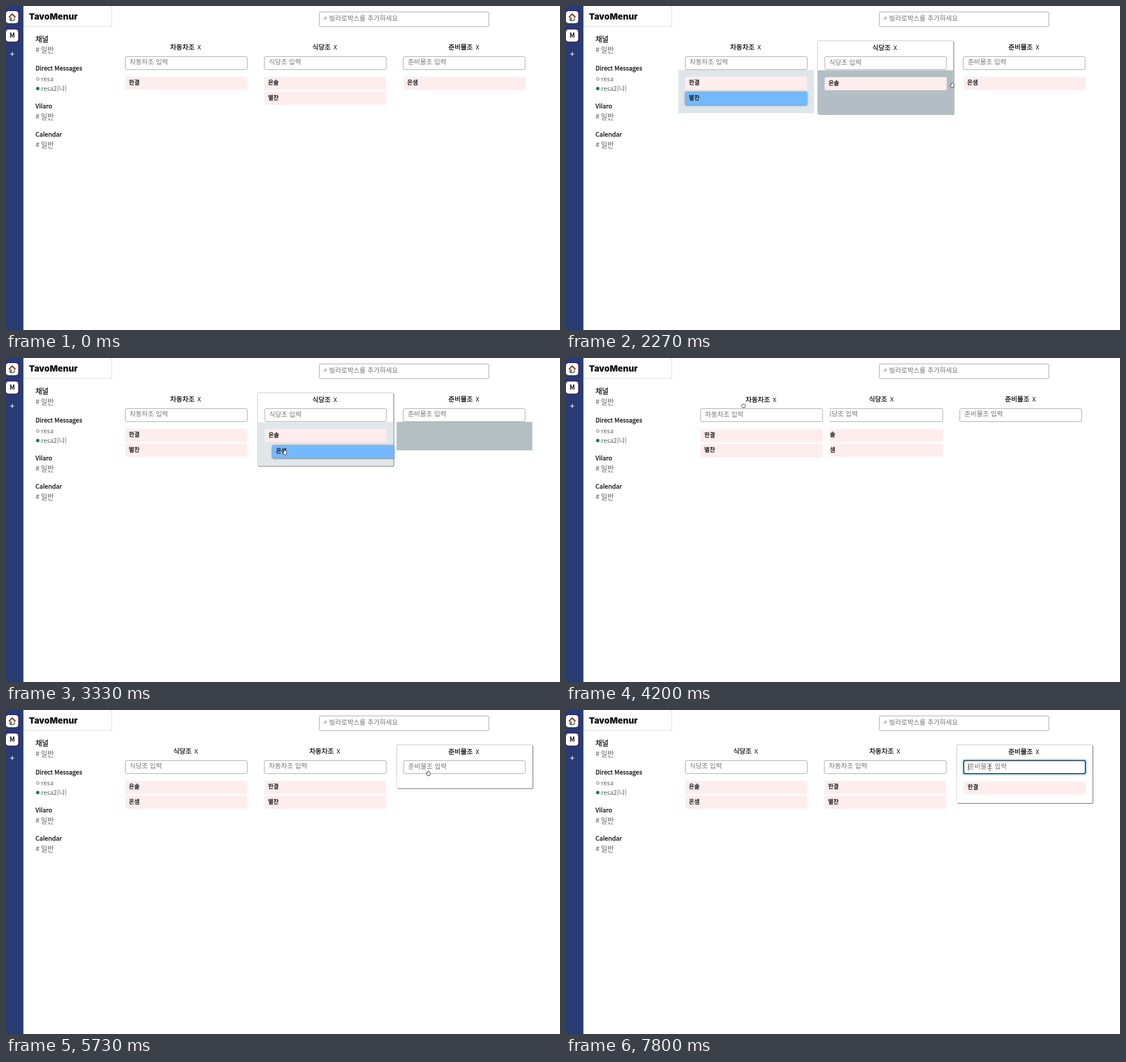
These frames come from a looping animation (977 px wide and 573 px high, 8 s). An HTML page:

```html
<!DOCTYPE html>
<html lang="ko">
<head>
<meta charset="utf-8">
<style>
  html, body { margin: 0; width: 100%; height: 100%; overflow: hidden; background: #fff; }
  svg { display: block; font: 11px "Noto Sans CJK KR", "Noto Sans CJK", "Noto Sans", sans-serif; fill: #111; }
  .brand { font: 900 15px Inter, sans-serif; }
  .medium { stroke: #111; stroke-width: .3; }
  .gray { fill: #606060; }
  .ko { font-size: 12.6px; }
  .title { font-size: 11.7px; text-anchor: middle; }
  .hint, .value { font-size: 11.7px; }
  .hint { fill: #757575; }
  .card { font-size: 10.2px; }
  .field { fill: #fff; stroke: #a9a9a9; }
  .focus { fill: #fff; stroke: #14202e; stroke-width: 1.5; }
  .glow { fill: #b4e1f3; }
  .tile { fill: #fff; stroke: #3f0e40; }
  .hover { stroke: #c8c8c8; filter: drop-shadow(1.5px 1.5px .7px #8a8a8a); }
  .paper { fill: #fff; }
  .rest { fill: #ffeded; }
  .lifted { fill: #74b9ff; filter: drop-shadow(0 1.5px 1.8px rgba(0, 0, 0, .5)); }
  .pointer { fill: #fff; stroke: #222; stroke-width: .9; stroke-linejoin: round; }
</style>
</head>
<body>
<svg width="977" height="573" viewBox="0 0 977 573">
  <rect width="30.7" height="573" fill="#273c75"/>
  <rect class="tile" x="-.5" y="8.5" width="22.5" height="22.5" rx="5"/>
  <path d="M7 19v7h8v-7l-4-4z" fill="#f4ead2" stroke="#333"/>
  <path d="M5 20l6-6 6 6" fill="none" stroke="#7c2f2b" stroke-width="1.6"/>
  <path d="M8 21h2v5h-2z" fill="#23804c"/>
  <rect class="tile" x="-.5" y="41" width="22.5" height="22.5" rx="5"/>
  <text x="11" y="56" text-anchor="middle" font-weight="700">M</text>
  <path d="M7.5 85h7M11 81.500v7" stroke="#fff" stroke-width="1.2"/>
  <path d="M31 36.500H186.500V0" fill="none" stroke="#dcdcdc"/>
  <text class="brand" x="40.500" y="24">TavoMenur</text>

  <g id="channels"></g>
  <text class="medium" x="52" y="113.5">Direct Messages</text>
  <circle cx="56" cy="129" r="2.4" fill="none" stroke="#777"/>
  <text class="gray" x="62" y="132.5">resa</text>
  <circle cx="56" cy="146" r="2.9" fill="#0a7a62"/>
  <text class="gray" x="62" y="149.5">resa2(나)</text>

  <rect class="field" x="552.5" y="10.5" width="299" height="26" rx="2.5"/>
  <text class="hint" x="560" y="26">+ 빌라로박스를 추가하세요</text>
  <g id="board"></g>
</svg>
<script>
const LOOP = 8000, STEP = 1000 / 15;
const WIDTH = 239.4, INNER = 215.3, ROW = 26.3, LIST_TOP = 113;
const slotX = i => 198 + 245.4 * i;
const cardPlace = (slot, row) => [slotX(slot) + 12, LIST_TOP + 12 + row * ROW];

// Pointer gestures: each eases from where the last one ended
const START = [156, 120];
const GESTURES = [
  { from: 400, to: 870, end: [483, 167] },
  { from: 1200, to: 1730, end: [216, 167] },
  { from: 1930, to: 2350, end: [734, 137] },
  { from: 2800, to: 3330, end: [492, 167] },
  { from: 3400, to: 3930, end: [286, 84] },
  { from: 4130, to: 4480, end: [548, 91] },
  { from: 4670, to: 5130, end: [745, 112] }
];

// Card and column moves; "enter" is when the card crosses into the new list
const CARD_DRAGS = [
  { name: '별찬', source: 1, dest: 0, lift: 1133, enter: 1467, drop: 1930, end: 2333 },
  { name: '온샘', source: 2, dest: 1, lift: 2867, enter: 3067, drop: 3333, end: 3667 }
];
const COLUMN_DRAG = { lift: 4130, enter: 4333, drop: 4667, end: 5000 };
const COLUMNS = [
  { name: '차동차조', cards: ['한결'] },
  { name: '식당조', cards: ['은솔', '별찬'] },
  { name: '준비물조', cards: ['온샘'] }
];

const FOCUS = 5930, MENU = 6000, TYPE = 7067, COMPOSE = 7267, SUBMIT = 7800;
const STAGES = ['ㅎ', '하', '한', '한ㄱ', '한겨', '한결'];

const within = (t, a, b) => t >= a && t < b;
const lerp = (a, b, p) => a + (b - a) * p;
const mix = (a, b, p) => a.map((v, i) => lerp(v, b[i], p));
const progress = (t, start, length) => Math.min(1, Math.max(0, (t - start) / length));
const easeOut = p => 1 - (1 - p) ** 4;
const easeInOut = p => p * p * (3 - 2 * p);

const pointerAt = t => GESTURES.reduce(
  (at, g) => mix(at, g.end, easeInOut(progress(t, g.from, g.to - g.from))), START);

// Follows the pointer until the drop, then settles on its new place
function carried(t, drag, home, place) {
  const grab = pointerAt(drag.lift), hand = pointerAt(Math.min(t, drag.drop));
  const held = home.map((v, i) => v + hand[i] - grab[i]);
  return mix(held, place, easeOut(progress(t, drag.drop, drag.end - drag.drop)));
}

const TINT = { none: [255, 255, 255], over: [223, 230, 233], left: [178, 190, 195] };
function listTint(t, index) {
  let color = TINT.none;
  const fade = (start, tone) => color = mix(color, TINT[tone], easeInOut(progress(t, start, 300)));
  for (const d of CARD_DRAGS) {
    if (d.source === index) { fade(d.lift, 'over'); fade(d.enter, 'left'); }
    if (d.dest === index) fade(d.enter, 'over');
    if (d.source === index || d.dest === index) fade(d.end, 'none');
  }
  return `rgb(${color.map(Math.round)})`;
}

// Cards lying in a list, and the rows it keeps open
function listState(t, index) {
  let cards = COLUMNS[index].cards, size = cards.length;
  for (const d of CARD_DRAGS) {
    if (d.source === index && t >= d.lift) cards = cards.filter(c => c !== d.name);
    if (d.dest === index && t >= d.end) cards = [...cards, d.name];
    size += (d.dest === index && t >= d.enter) - (d.source === index && t >= d.end);
  }
  if (index === 2 && t >= SUBMIT) { cards = [STAGES[5]]; size = 1; }
  return { cards, size, fill: listTint(t, index) };
}

function columnPlace(t, index) {
  const d = COLUMN_DRAG, gap = within(t, d.lift, d.end) ? 6 : 0;
  if (index === 0) return t < d.lift ? [slotX(0), 0] : carried(t, d, [slotX(0), 0], [slotX(1), 0]);
  const swap = index === 1 ? easeOut(progress(t, d.enter, 250)) : 0;
  return [lerp(slotX(index) - gap, slotX(0), swap), 0];
}

function typed(t) {
  if (!within(t, TYPE, SUBMIT)) return '';
  return STAGES[t < COMPOSE ? 0 : Math.min(5, 1 + Math.floor((t - COMPOSE) / 83))];
}

const rect = (x, y, w, h, cls, attrs = '') =>
  `<rect x="${x}" y="${y}" width="${w}" height="${h}" class="${cls}" ${attrs}/>`;
const text = (x, y, cls, s) => `<text x="${x}" y="${y}" class="${cls}">${s}</text>`;
const card = ([x, y], name, look) =>
  rect(x, y, INNER, 23.4, look, 'rx="2.5"') + text(x + 6.8, y + 14.4, 'medium card', name);

function column({ x, y, name, cards, size, fill, hover, focus, value }) {
  const height = 24 + size * ROW, inset = hover ? .7 : 0;
  const left = x + 12 + inset, top = y + inset, w = 215 - inset;
  const fieldX = Math.floor(left) + .5, fieldY = Math.floor(top + 89) + .5;
  const list = top + LIST_TOP;
  return rect(x + .3, y + 61.3, WIDTH, 51.5 + height + 2 * inset, hover ? 'paper hover' : 'paper', 'rx="2"') +
    rect(x + inset, list, WIDTH - inset, height, '', `fill="${fill}"`) +
    text(x + WIDTH / 2 - 1, top + 76.8, 'title', `<tspan class="medium">${name}</tspan><tspan dx="5" font-size="11">X</tspan>`) +
    (focus ? rect(fieldX - 3, fieldY - 3, w + 6, 29, 'glow', 'rx="4"') : '') +
    rect(fieldX, fieldY, w, 23, focus ? 'focus' : 'field', 'rx="2.5"') +
    text(left + 8, top + 103, value ? 'value' : 'hint', value || name + ' 입력') +
    cards.map((c, i) => card([left, list + 12 + i * ROW], c, 'rest')).join('');
}

const ARROW = 'M-3-5V5L-.5 3 1 6 2 6 1 2H4z';
const FIST = 'M-3 2C-4-1-3-3-1-3L2-3C4-2 3 1 2 3H-2z';
const HAND = 'M-2 4-4 0-3-1-2 0V-3L0-4 2-3 3-2V1L2 4z';
const BEAM = 'M-2-5 0-4 2-5M0-4V5M-2 6 0 5 2 6';
function pointer(t, [x, y]) {
  if (t < GESTURES[0].from) return '';
  if (t >= 5867) return `<path d="${BEAM}" transform="translate(747.5 102)" fill="none" stroke="#444" stroke-width=".8"/>`;
  const shape = x < slotX(0) ? ARROW : within(t, COLUMN_DRAG.lift, COLUMN_DRAG.end) ? FIST : HAND;
  return `<path class="pointer" transform="translate(${x} ${y})" d="${shape}"/>`;
}

const menu = () => rect(701.5, 115.5, 215, 138, 'paper', 'stroke="#c8c8c8" rx="2"') +
  ['한결', '은솔', '별찬', '온샘', '가람'].map((n, i) => text(709.5, 134 + i * ROW, 'card', n)).join('');

function render(t) {
  const hand = pointerAt(t), focus = t >= FOCUS, value = typed(t);
  const blocked = within(t, COLUMN_DRAG.lift, COLUMN_DRAG.end) ||
    CARD_DRAGS.some(d => within(t, d.lift, d.drop));
  const drawColumn = index => {
    const [x, y] = columnPlace(t, index);
    const hover = t >= GESTURES[0].from && !blocked && within(hand[0], x, x + WIDTH);
    const input = index === 2 ? { focus, value } : {};
    return column({ x, y, name: COLUMNS[index].name, hover, ...listState(t, index), ...input });
  };

  let out = [1, 2, 0].map(drawColumn).join('');
  for (const d of CARD_DRAGS) if (within(t, d.lift, d.end)) {
    const home = cardPlace(d.source, COLUMNS[d.source].cards.indexOf(d.name));
    out += card(carried(t, d, home, cardPlace(d.dest, 1)), d.name, 'lifted');
  }
  if (within(t, MENU, TYPE)) out += menu();
  if (focus && !within(t, FOCUS + 600, TYPE)) out += rect(709 + value.length * 10.8, 94.5, .8, 12.5, '');
  board.innerHTML = out + pointer(t, hand);
}

const board = document.getElementById('board');
document.getElementById('channels').innerHTML =
  Object.entries({ '채널': 63, Vilaro: 180.5, Calendar: 230.5 }).map(([name, y]) =>
    text(52, y, name === '채널' ? 'medium ko' : 'medium', name) +
    text(52, y + 19, 'gray ko', '#<tspan dx="2.5">일반</tspan>')).join('');

// The picture advances at 15 steps per second
function tick() {
  const t = performance.now() % LOOP;
  render(Math.round(Math.floor((t + 3.4) / STEP) * STEP));
  requestAnimationFrame(tick);
}
tick();
</script>
</body>
</html>
```
